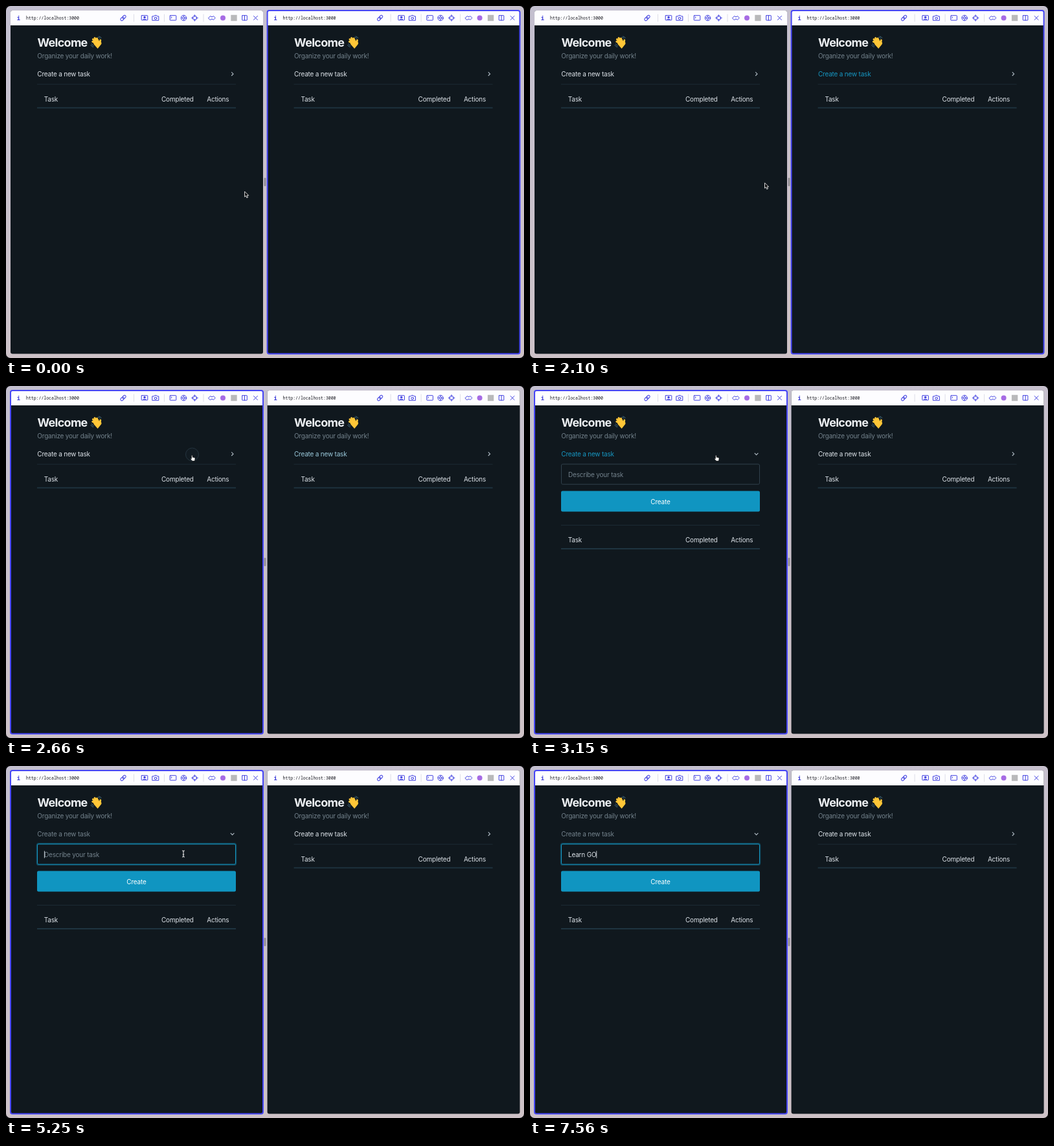
These frames come from a looping animation (800 px wide and 545 px high, 8 s). An HTML page:

```html
<!DOCTYPE html>
<html lang="en">
<head>
<meta charset="utf-8">
<title>Daily tasks</title>
<style>
html, body { margin: 0; width: 800px; height: 545px; overflow: hidden; background: #08080a; }
svg { display: block; }
text { font: 400 10px Inter, "Open Sans", sans-serif; letter-spacing: -.02em; white-space: pre; fill: #dce2e8; }
.title { font-size: 18px; font-weight: 700; letter-spacing: -.04em; fill: #edf0f3; }
.muted { fill: #73828c; }
.url { font: 500 6.5px "Noto Sans Mono", "DejaVu Sans Mono", monospace; letter-spacing: 0; fill: #15151c; }
.info { font: 700 9px "Noto Sans Mono", monospace; fill: #3a3ad8; }
.icons { fill: none; stroke: #3f3fe0; stroke-width: 1; stroke-linejoin: round; stroke-linecap: round; }
.wave { fill: none; stroke: #ffc637; stroke-width: 3; stroke-linecap: round; }
</style>
</head>
<body>
<svg id="stage" width="800" height="545" viewBox="0 0 800 545"></svg>
<script>
const STEP = 70, LOOP = 8000, LAST_CHANGE = 7560, BLINK = 490;
const OPEN = 2730, FOCUS = 3850;
const WHITE = [220, 226, 232], BLUE = [22, 150, 193], GRAY = [115, 130, 140];
const KEYS = [[5810, 'L'], [6020, 'e'], [6230, 'a'], [6440, 'r'], [6650, 'n'], [6860, ' '], [7210, 'G'], [7420, 'O']];

const icon = (x, shape) => `<g transform="translate(${x} 18.5)">${shape}</g>`;
const separator = x => `<path d="M${x} 13v11" stroke="#dedee8"/>`;

const toolbar = `
  <path d="M7 30V10a3 3 0 0 1 3-3H394a3 3 0 0 1 3 3V30z" fill="#fdfdff"/>
  <text class="info" x="16.8" y="21.8">i</text>
  <text class="url" x="31" y="20.9">http://localhost:3000</text>
  <g class="icons">
    ${icon(181, '<g transform="rotate(-45)"><rect x="-5" y="-2" width="6" height="4" rx="2"/><rect x="-1" y="-2" width="6" height="4" rx="2"/></g>')}
    ${separator(197.5)}
    ${icon(214, '<rect x="-4.8" y="-3.8" width="9.6" height="7.2" rx=".6"/><circle r="1.3" cy="-1" fill="#3f3fe0"/><path d="M-2 2h4"/>')}
    ${icon(231, '<path d="M-4.8-2.6H-2.4L-1.4-4H1.4L2.4-2.6H4.8V3.8H-4.8z"/><circle r="1.8" cy=".5"/>')}
    ${separator(244.5)}
    ${icon(258, '<rect x="-4.8" y="-3.8" width="9.6" height="7.4" rx=".6"/><path d="M-3-1.8l1.2 1-1.2 1"/>')}
    ${icon(274.5, '<circle r="4.2"/><circle r="1.7"/><path d="M-1-1.6L1-4M1.6-.8L4 1M1 1.6L-1 4M-1.6.8L-4-1" stroke-width=".9"/>')}
    ${icon(291.5, '<circle r="3.3"/><path d="M0-4.8v2.8M0 2v2.8M-4.8 0h2.8M2 0h2.8"/>')}
    ${separator(305)}
    ${icon(318, '<path d="M-5.2 0L-2.4-3-1-1.8H1L2.4-3 5.2 0 2.4 3 1 1.8H-1L-2.4 3z"/>')}
    ${icon(335, '<circle r="4" fill="#a66be4" stroke="none"/>')}
    ${icon(352, '<rect x="-4.7" y="-4.7" width="9.4" height="9.4" fill="#b9b9bb" stroke="none"/>')}
    ${icon(368.5, '<rect x="-3.8" y="-3.8" width="7.6" height="7.4" rx=".4"/><path d="M0-3.8v7.4"/>')}
    ${icon(385.5, '<path d="M-3-3l6 6M3-3l-6 6"/>')}
  </g>`;

const hand = `
  <g class="wave">
    <path d="M141 58l-7.2-2.8M141 57l-6.6-5.4M142 56l-5-6.4M143 56l-2.6-5.6"/>
    <path d="M145 58.5l.8-5.6" stroke-width="2.8"/>
    <path d="M138.5 57.5l3 3.4 2.6-3.2" stroke-width="6.5"/>
    <path d="M142 48.2q2.2.5 3.2 2M143.6 46.9q2.6.7 3.6 2.6M132.4 58.6q.8 2.2 3 3.2M131 60.4q1.2 2.4 3.6 3.2" stroke="#4d7d96" stroke-width=".8"/>
  </g>`;

const form = `
  <rect class="halo" x="47.7" y="120" width="307.6" height="33.2" rx="3" fill="none" stroke="#1095c1" stroke-opacity=".4" stroke-width="1.8"/>
  <rect class="field" x="48.5" y="121" width="306" height="31.2" rx="2" fill="#10181e"/>
  <text class="muted hint" x="59" y="140.5">Describe your task</text>
  <text class="value" x="59" y="140.5"></text>
  <path class="caret" d="M0 131.5v11" stroke="#dce2e8" stroke-width=".9"/>
  <rect x="48" y="162.5" width="307" height="32" rx="2.2" fill="#1095c1"/>
  <text x="201.5" y="182.5" text-anchor="middle" style="fill:#fff">Create</text>`;

const pane = (name, x) => `
  <g id="${name}" transform="translate(${x})">
    <rect x="7" y="7" width="390" height="531.5" rx="3" fill="#10181e"/>
    ${toolbar}
    <text class="title" x="48.5" y="63">Welcome</text>
    ${hand}
    <text class="muted" x="48.3" y="80.8">Organize your daily work!</text>
    <text class="summary" x="48.3" y="109">Create a new task</text>
    <path class="chevron" d="M-2.8-1.4L0 1.4 2.8-1.4" fill="none" stroke="#b4bfc8" stroke-width="1.1"/>
    <g class="form">${form}</g>
    <g class="table">
      <path d="M48 121.2H355" stroke="#1c2a34" stroke-width="1"/>
      <text x="58.8" y="148">Task</text>
      <text x="240" y="148">Completed</text>
      <text x="310.3" y="148">Actions</text>
      <path d="M48 157.7H355" stroke="#1f3440" stroke-width="1.8"/>
    </g>
    <rect class="border" x="7" y="7" width="390" height="531.5" rx="3" fill="none" stroke="#4545f5" stroke-width="2"/>
  </g>`;

const stage = document.getElementById('stage');
stage.innerHTML = `
  <linearGradient id="wall" x2=".3" y2="1"><stop stop-color="#c3bfcf"/><stop offset="1" stop-color="#cec2c7"/></linearGradient>
  <rect width="800" height="545" rx="7" fill="url(#wall)"/>
  ${pane('left', 0)}${pane('right', 396.6)}
  <rect x="398.6" y="266" width="2.8" height="13" rx="1.2" fill="#8e8a92"/>
  <circle id="ring" r="10" fill="#1b2833" fill-opacity=".3" stroke="#30424f" stroke-width="1"/>
  <g id="pointer">
    <path id="arrow" d="M-1.7-4.8V3.5L.2 1.8 1.6 5 3.2 4.3 1.8 1.3H4.4z" fill="#0a0a0c" stroke="#eee" stroke-width=".9"/>
    <path id="finger" d="M-1.5-4q1-.8 1.5.4V-1.3L3.3-.5Q4.2 0 4 1L3.4 4.6H-.4L-3 1.6Q-3.2.4-1.5 1z" fill="#fff" stroke="#111" stroke-width=".6"/>
    <path id="beam" d="M-2-5Q0-5 0-3.8Q0-5 2-5M0-3.8V3.8M-2 5Q0 5 0 3.8Q0 5 2 5M-1.2 1.2H1.2" fill="none" stroke="#e8e8e8" stroke-width="1.1"/>
  </g>`;

const find = selector => stage.querySelector(selector);
const set = (selector, attrs) => {
  for (const key in attrs) find(selector).setAttribute(key, attrs[key]);
};
const show = (selector, on) => { find(selector).style.display = on ? '' : 'none'; };
const ramp = (t, start, end) => Math.max(0, Math.min(1, (t - start) / (end - start)));
const ease = k => k * k * (3 - 2 * k);
const lerp = (a, b, k) => a + (b - a) * k;
const mix = (a, b, k) => `rgb(${a.map((v, i) => Math.round(lerp(v, b[i], k)))})`;
const valueEl = find('#left .value');

function drawPane(name, open, turn, active) {
  set(`#${name} .table`, { transform: `translate(0 ${open ? 94.3 : 0})` });
  set(`#${name} .chevron`, { transform: `translate(349.6 105.2) rotate(${-90 * (1 - turn)})` });
  set(`#${name} .border`, { opacity: active });
  show(`#${name} .form`, open);
}

function drawForm(t) {
  const focus = ramp(t, FOCUS - STEP, FOCUS + 140);
  const typed = KEYS.filter(([time]) => time <= t);
  const lastKey = typed.length ? typed[typed.length - 1][0] : FOCUS;
  valueEl.textContent = typed.map(([, char]) => char).join('');
  show('#left .hint', !typed.length);
  show('#left .caret', t >= FOCUS && (t - lastKey) % (2 * BLINK) < BLINK);
  set('#left .caret', { transform: `translate(${59.4 + (typed.length ? valueEl.getComputedTextLength() : 0)})` });
  set('#left .halo', { opacity: focus });
  set('#left .field', { stroke: mix([48, 64, 76], BLUE, focus) });
}

function drawPointer(t) {
  const up = ease(ramp(t, 2030, 2450)), down = ease(ramp(t, 3150, 3570));
  const x = lerp(lerp(370.3, 288, up), 274, down);
  const y = lerp(lerp(292, 111.5, up), 136, down);
  const kind = y > 150 ? 'arrow' : y < 121 ? 'finger' : 'beam';
  for (const id of ['arrow', 'finger', 'beam']) show('#' + id, id === kind);
  set('#pointer', { transform: `translate(${x} ${y})` });
  show('#pointer', t < KEYS[0][0]);

  const click = t < 3000 ? 2450 : 3710;
  const glow = ramp(t, click, click + 70) * (1 - ramp(t, click + 140, click + 350));
  set('#ring', { cx: x - .5, cy: y - 5.5, opacity: glow });
}

function draw(now) {
  const t = Math.min(LAST_CHANGE, Math.floor(now % LOOP / STEP) * STEP);
  const swap = ramp(t, 2450, 2660);
  drawPane('left', t >= OPEN, ramp(t, OPEN - STEP, OPEN + 140), swap);
  drawPane('right', false, 0, 1 - swap);
  find('#left .summary').style.fill = t < FOCUS - STEP
    ? mix(WHITE, BLUE, ramp(t, OPEN - STEP, 2940))
    : mix(BLUE, GRAY, ramp(t, FOCUS - STEP, FOCUS + 140));
  find('#right .summary').style.fill =
    mix(WHITE, BLUE, ramp(t, 0, 280) * (1 - ramp(t, 2520, 2730)));
  drawForm(t);
  drawPointer(t);
}

const start = performance.now();
(function tick() {
  draw(performance.now() - start);
  requestAnimationFrame(tick);
})();
</script>
</body>
</html>
```
